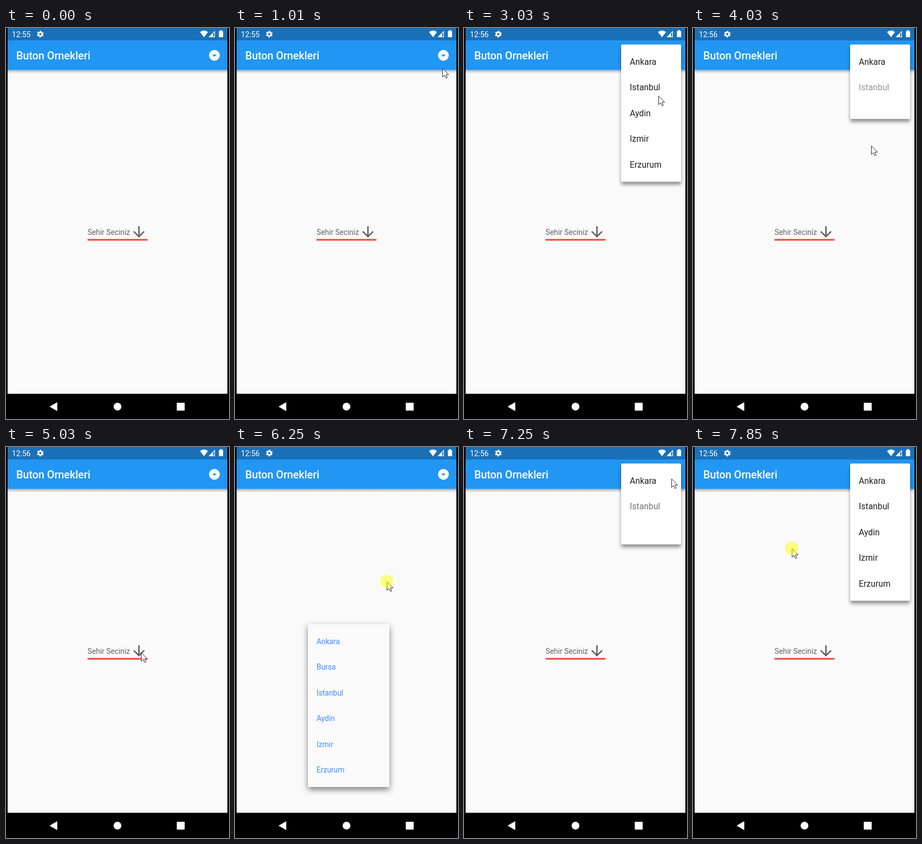
Recreate the animation shown at these times as an HTML page. Size 413x722 px, loop 8000 ms.

```html
<!DOCTYPE html>
<html lang="tr">
<head>
<meta charset="utf-8">
<title>Buton Ornekleri</title>
<style>
html, body { margin: 0; width: 100%; height: 100%; overflow: hidden; background: #000; }
svg { display: block; width: 100%; height: 100%; font-family: Roboto, sans-serif; }
</style>
</head>
<body>
<svg viewBox="0 0 413 722">
  <defs>
    <linearGradient id="fade" x2="0" y2="1">
      <stop stop-opacity=".32"/><stop offset=".5" stop-opacity=".12"/><stop offset="1" stop-opacity="0"/>
    </linearGradient>
    <filter id="lift" x="-20%" y="-20%" width="140%" height="140%">
      <feDropShadow dx="0" dy="5.5" stdDeviation="3.2" flood-opacity=".42"/>
    </filter>
    <filter id="liftWide" x="-20%" y="-20%" width="140%" height="140%">
      <feDropShadow dx="0" dy="5" stdDeviation="6" flood-opacity=".5"/>
    </filter>
  </defs>

  <rect width="413" height="722"/>
  <rect x="3" width="407" height="675.5" fill="#fafafa"/>
  <rect x="3" y="77.5" width="407" height="7" fill="url(#fade)"/>
  <rect x="3" y="22" width="407" height="55.5" fill="#2196f3"/>
  <rect x="3" width="407" height="23" fill="#1a70b7"/>

  <g fill="#fff">
    <text id="clock" x="11" y="16.5" font-size="13.85"></text>
    <g fill="none" stroke="#fff">
      <circle cx="63.5" cy="11.3" r="3.4" stroke-width="2.6"/>
      <circle cx="63.5" cy="11.3" r="5.1" stroke-width="2.2" stroke-dasharray="2.8 2.54" stroke-dashoffset="-1.27"/>
    </g>
    <path d="M359.3 7.4Q366.7 1.8 374.1 7.4L366.7 17Z"/>
    <path d="M375 17L387 5V17ZM383.5 10.2V15.8H385.8V7.9Z" fill-rule="evenodd"/>
    <path d="M396.4 4h3.6v1.6h1.1q1 0 1 1v9.4q0 1-1 1h-5.8q-1 0-1-1V6.6q0-1 1-1h1.1z"/>
    <text x="19" y="58" font-size="19.8" font-weight="500">Buton Ornekleri</text>
    <circle cx="386" cy="50.5" r="10"/>
    <path d="M81.5 699.2L94.5 691.7V706.7Z" stroke="#fff" stroke-linejoin="round"/>
    <circle cx="206.5" cy="699.2" r="7.2"/>
    <rect x="316.3" y="692" width="14.6" height="14.6" rx="1"/>
  </g>
  <path d="M381.8 49h8.4l-4.2 4.2z" fill="#2196f3"/>

  <text x="151" y="381.8" font-size="13.85" fill="#646464">Sehir Seciniz</text>
  <path d="M20 12l-1.41-1.41L13 16.17V4h-2v12.17l-5.58-5.59L4 12l8 8z" fill="#616161"
    transform="translate(246.2 376.5) scale(1.32) translate(-12 -12)"/>
  <rect x="151" y="389.6" width="111" height="3" fill="#f44336"/>

  <g id="popup"></g>
  <g id="drop"></g>

  <g id="cursor">
    <path d="M.5.8V16.6L4.2 13.2L6.7 18.7L9.2 17.6L6.8 12.2H11.7Z" fill="#fff" stroke="#111" stroke-width=".9"/>
    <circle id="halo" r="12.2" fill="#ff0"/>
  </g>
</svg>
<script>
const LOOP = 8000, TICK = 201, ROW = 47.5;
const $ = id => document.getElementById(id);
const ramp = (p, a, b) => Math.min(1, Math.max(0, (p - a) / (b - a)));
const easeOut = p => 1 - (1 - p) ** 2;

function makeMenu(id, labels, box, style) {
  const group = $(id);
  const add = (name, attrs) => {
    const el = document.createElementNS('http://www.w3.org/2000/svg', name);
    for (const key in attrs) el.setAttribute(key, attrs[key]);
    return group.appendChild(el);
  };
  const panel = add('rect', { ...box, rx: 2, fill: style.back, filter: `url(#${style.shadow})` });
  const items = labels.map((label, i) => {
    const el = add('text', {
      x: box.x + 16, y: box.y + 31.8 + i * ROW + style.size * .36,
      'font-size': style.size, fill: style.ink
    });
    el.textContent = label;
    return el;
  });
  return { group, panel, items, full: labels.length * ROW + 15.8 };
}

const popup = makeMenu('popup', ['Ankara', 'Istanbul', 'Aydin', 'Izmir', 'Erzurum'],
  { x: 291, y: 30.5, width: 111 }, { back: '#fff', ink: '#212121', size: 15.83, shadow: 'lift' });
const drop = makeMenu('drop', ['Ankara', 'Bursa', 'Istanbul', 'Aydin', 'Izmir', 'Erzurum'],
  { x: 135, y: 327, width: 151 }, { back: '#fafafa', ink: '#448aff', size: 13.85, shadow: 'liftWide' });

// Items fade in one after another while the panel grows.
function drawMenu(menu, p, base, grow, alpha) {
  menu.group.style.display = p ? '' : 'none';
  menu.group.setAttribute('opacity', alpha);
  menu.panel.setAttribute('height', menu.full * grow);
  const unit = (1 - base) / (menu.items.length + 1.5);
  menu.items.forEach((el, i) => {
    const start = base + (i + 1) * unit;
    el.setAttribute('opacity', ramp(p, start, start + 1.5 * unit));
  });
}

const progress = (t, open, close, closeTime = 300) =>
  Math.min(ramp(t, open, open + 300), 1 - ramp(t, close, close + closeTime));

// Pointer moves: start time, end time, goal.
const home = [366, 697];
const moves = [
  [200, 1206, 385, 48],
  [2800, 3618, 330, 217],
  [4020, 5025, 250, 379],
  [5628, 6231, 281, 248],
  [6231, 6834, 384, 58],
  [7236, 7437, 345, 15],
  [7437, 7839, 183, 187]
];
const clicks = [1809, 3819, 6231, 7839];

function pointerAt(t) {
  return moves.reduce(([x, y], [start, end, gx, gy]) => {
    const k = easeOut(ramp(t, start, end));
    return [x + (gx - x) * k, y + (gy - y) * k];
  }, home);
}

function draw(time) {
  const t = Math.floor(time / TICK) * TICK; // the screen refreshes in steps
  $('clock').textContent = t < 3000 ? '12:55' : '12:56';
  $('cursor').setAttribute('transform', `translate(${pointerAt(t).map(Math.round)})`);
  $('cursor').setAttribute('opacity', t ? 1 : 0);
  $('halo').setAttribute('opacity', clicks.includes(t) ? .5 : 0);

  const pop = Math.max(progress(t, 2500, 3845), progress(t, 7100, LOOP));
  const n = popup.items.length;
  drawMenu(popup, pop, 0, ramp(pop, 0, n / (n + 1.5)), ramp(pop, 0, 1 / 3));
  const down = progress(t, 5450, 6231, 150);
  drawMenu(drop, down, .5, .2 + .8 * ramp(down, .25, .5), ramp(down, 0, .25));
}

const begin = performance.now();
function tick() {
  draw((performance.now() - begin) % LOOP);
  requestAnimationFrame(tick);
}
tick();
</script>
</body>
</html>
```
